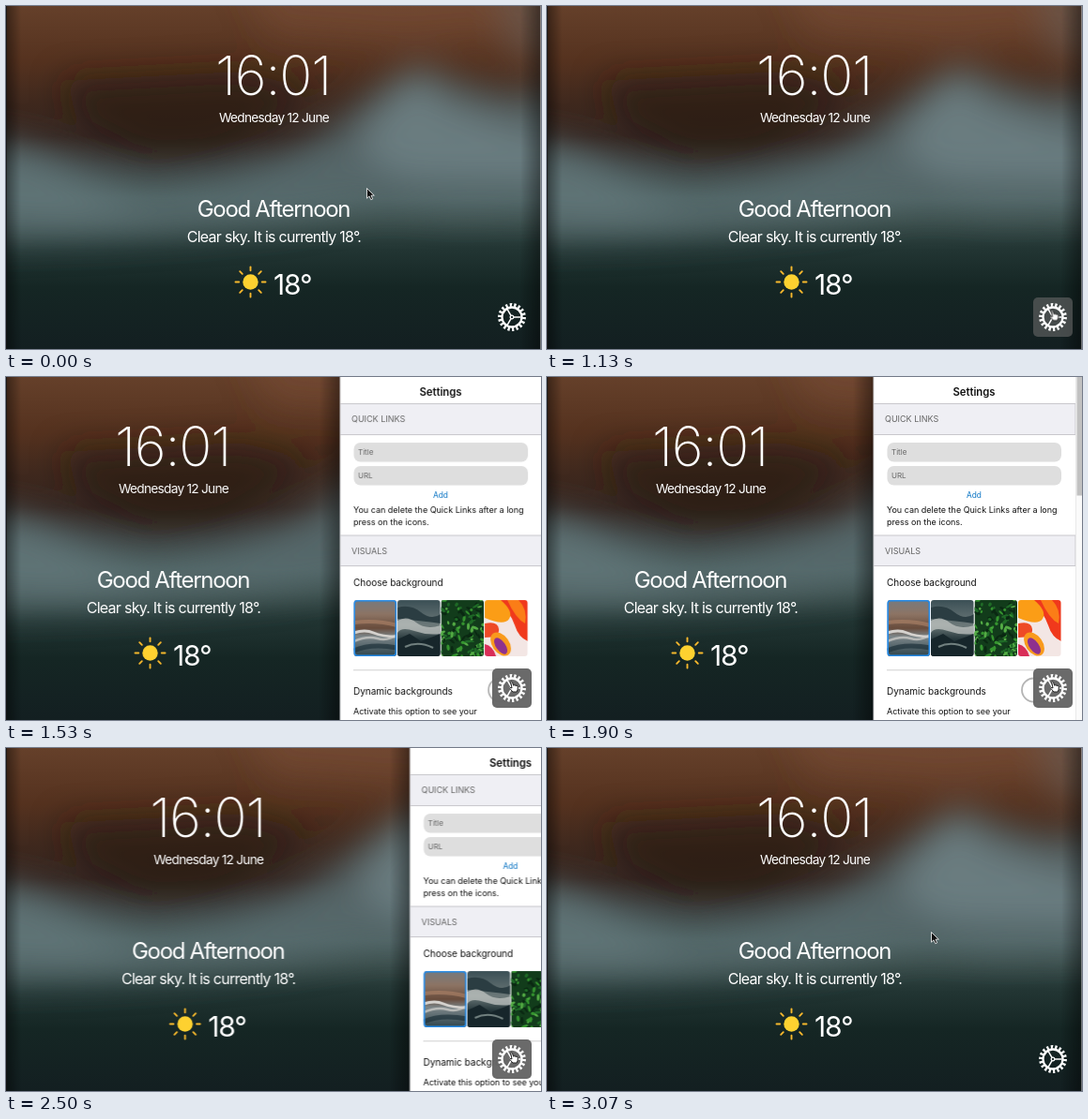
An HTML page that plays this animation: 570 by 366 pixels, repeating every 4.1 s.

```html
<!DOCTYPE html>
<html lang="en">
<head>
<meta charset="utf-8">
<title>New tab with settings panel</title>
<style>
html, body { margin: 0; width: 100%; height: 100%; overflow: hidden; background: #131f21; }
svg { display: block; }
#stage { width: 570px; height: 366px; }

.main { fill: #fff; font-family: Inter, "Open Sans", sans-serif; text-anchor: middle; letter-spacing: -.048em; }
.clock { font-size: 58px; font-weight: 200; letter-spacing: -.02em; font-feature-settings: "calt" 0; }
.date { font-size: 13.7px; letter-spacing: -.054em; }
.greet { font-size: 24px; letter-spacing: -.055em; }
.sky { font-size: 16px; letter-spacing: -.046em; }
.temp { font-size: 30px; text-anchor: start; letter-spacing: -.04em; }

.panel { font-family: Inter, "Open Sans", sans-serif; font-size: 9px; fill: #111; }
.title { font-size: 11.3px; font-weight: 600; text-anchor: middle; }
.head { font-size: 9px; fill: #666; }
.label { font-size: 10px; }
.hint { font-size: 8px; fill: #666; }
.add { font-size: 8.3px; fill: #0a74c4; text-anchor: middle; }

.main, .panel, .cursor, .arrow, .hand, .hover { animation: 4.1s infinite both; }
.main { animation-name: shift; animation-timing-function: ease-in-out; }
.panel { animation-name: slide; animation-timing-function: ease-in-out; }
.cursor { animation-name: point; }
.arrow { animation-name: arrow; animation-timing-function: step-end; }
.hand { animation-name: hand; animation-timing-function: step-end; }
.hover { animation-name: hover; animation-timing-function: linear; }

@keyframes shift {
  0%, 28.9% { transform: translateX(0); }
  38.66%, 56.87% { transform: translateX(-111px); }
  66.6%, 100% { transform: translateX(0); }
}
@keyframes slide {
  0%, 28.9% { transform: translateX(570px); }
  38.66%, 56.87% { transform: translateX(348px); }
  66.6%, 100% { transform: translateX(570px); }
}
@keyframes point {
  0% { transform: translate(384px, 194px); }
  16.2% { transform: translate(384px, 194px); animation-timing-function: ease-in-out; }
  28.05% { transform: translate(538px, 325px); }
  64.4% { transform: translate(538px, 325px); animation-timing-function: ease-in; }
  66.7% { transform: translate(516px, 313px); animation-timing-function: cubic-bezier(.3, .35, .5, 1); }
  74.6%, 100% { transform: translate(409px, 196px); }
}
@keyframes arrow {
  0% { opacity: 1; }
  25.4% { opacity: 0; }
  67.6%, 100% { opacity: 1; }
}
@keyframes hand {
  0% { opacity: 0; }
  25.4% { opacity: 1; }
  67.6%, 100% { opacity: 0; }
}
@keyframes hover {
  0%, 25.3% { opacity: 0; }
  28.8%, 67.8% { opacity: 1; }
  71.2%, 100% { opacity: 0; }
}
</style>
</head>
<body>
<svg id="stage" viewBox="0 0 570 366">
  <defs>
    <linearGradient id="haze" x2="0" y2="1">
      <stop offset="0" stop-color="#65402a"/>
      <stop offset=".16" stop-color="#55321f"/>
      <stop offset=".28" stop-color="#40291e"/>
      <stop offset=".38" stop-color="#35251f"/>
      <stop offset=".47" stop-color="#3f4342"/>
      <stop offset=".56" stop-color="#485c5b"/>
      <stop offset=".63" stop-color="#3a4d4b"/>
      <stop offset=".71" stop-color="#223533"/>
      <stop offset=".82" stop-color="#152624"/>
      <stop offset="1" stop-color="#131f21"/>
    </linearGradient>
    <linearGradient id="edge">
      <stop offset="0" stop-color="#000" stop-opacity="0"/>
      <stop offset="1" stop-color="#000" stop-opacity=".42"/>
    </linearGradient>
    <linearGradient id="shore" x2="0" y2="1">
      <stop offset="0" stop-color="#777a7e"/>
      <stop offset=".25" stop-color="#8d7464"/>
      <stop offset=".5" stop-color="#684c3c"/>
      <stop offset=".65" stop-color="#7d878a"/>
      <stop offset="1" stop-color="#2e444c"/>
    </linearGradient>
    <linearGradient id="storm" x2="0" y2="1">
      <stop offset="0" stop-color="#3c5056"/>
      <stop offset=".45" stop-color="#6c7979"/>
      <stop offset=".7" stop-color="#26373b"/>
      <stop offset="1" stop-color="#14232a"/>
    </linearGradient>
    <filter id="blur" filterUnits="userSpaceOnUse" x="-120" y="-120" width="810" height="606">
      <feGaussianBlur stdDeviation="18"/>
    </filter>
    <filter id="soft"><feGaussianBlur stdDeviation=".7"/></filter>
    <clipPath id="thumb"><rect width="45.5" height="60" rx="3"/></clipPath>
  </defs>

  <rect width="570" height="366" fill="url(#haze)"/>
  <g filter="url(#blur)">
    <path d="M-60 135L30 150L90 178L150 200L230 185L300 160L355 122L400 85L440 62L480 80L530 95L640 85V212L480 217L400 210L300 228L200 238L100 245L-60 250Z" fill="#5a6f72" opacity=".8"/>
    <path d="M60 80L250 70L330 90L290 125L230 160L150 165L80 130Z" fill="#281a15" opacity=".7"/>
    <path d="M370 150L400 110L435 75L470 105L560 135L640 125V185L420 180Z" fill="#7b9095" opacity=".6"/>
    <path d="M-60 155L30 165L110 205L180 222L60 230L-60 210Z" fill="#6a8082" opacity=".45"/>
    <path d="M250 -40H560V30L420 40L280 30Z" fill="#7d4f36" opacity=".5"/>
    <path d="M520 -40H640V70L535 55Z" fill="#6b6059" opacity=".55"/>
  </g>
  <rect width="16" height="366" fill="url(#edge)" transform="matrix(-1 0 0 1 16 0)"/>

  <g class="main">
    <text class="clock" x="284.500" y="94.500">16:01</text>
    <text class="date" x="285.500" y="124">Wednesday 12 June</text>
    <text class="greet" x="285" y="225">Good Afternoon</text>
    <text class="sky" x="285.500" y="251.500">Clear sky. It is currently 18°.</text>
    <g id="sun" transform="translate(260.500 294.500)" stroke="#f8b92d" stroke-width="1.900" stroke-linecap="round">
      <circle r="8.200" fill="#fdd130" stroke="none"/>
    </g>
    <text class="temp" x="285" y="307.700">18°</text>
  </g>
  <rect width="1" height="366" fill="#151515" opacity=".8"/>

  <g class="panel">
    <rect x="-22" width="22" height="366" fill="url(#edge)"/>
    <rect width="224" height="366" fill="#fff"/>
    <text class="title" x="107" y="20">Settings</text>
    <g fill="#efeff4" stroke="#c8c7cc">
      <path d="M0 28.500H215V61.500H0M0 169H215V201.500H0"/>
    </g>
    <path d="M0 0V366" stroke="#d5d5d8"/>
    <text class="head" x="12" y="48">QUICK LINKS</text>
    <g fill="#dedede">
      <rect x="14.500" y="70" width="185.500" height="20.500" rx="7"/>
      <rect x="14.500" y="95" width="185.500" height="20.500" rx="7"/>
    </g>
    <text class="hint" x="19" y="83.300">Title</text>
    <text class="hint" x="19" y="108.300">URL</text>
    <text class="add" x="107" y="128.500">Add</text>
    <text x="14" y="145">You can delete the Quick Links after a long</text>
    <text x="14" y="158">press on the icons.</text>
    <text class="head" x="12" y="189">VISUALS</text>
    <text class="label" x="14" y="222.500">Choose background</text>

    <g transform="translate(14.500 238)">
      <g clip-path="url(#thumb)">
        <rect width="46" height="60" fill="url(#shore)"/>
        <g filter="url(#soft)" fill="none" stroke="#d5d2ce">
          <path d="M0 35Q12 31 21 35T46 39" stroke-width="3"/>
          <path d="M0 44Q14 38 25 41T46 37" stroke-width="2.500" opacity=".7"/>
          <path d="M0 24Q24 21 46 27" stroke="#b08468" stroke-width="4" opacity=".6"/>
          <path d="M0 54Q18 46 46 51" stroke="#1f333b" stroke-width="5" opacity=".7"/>
        </g>
      </g>
      <rect x=".7" y=".7" width="44.100" height="58.600" rx="3" fill="none" stroke="#2389e6" stroke-width="1.600"/>
    </g>
    <g transform="translate(61 238)" clip-path="url(#thumb)">
      <rect width="46" height="60" fill="url(#storm)"/>
      <g filter="url(#soft)">
        <path d="M0 8Q14 4 25 13T46 15V25Q25 22 0 20Z" fill="#2b3d42"/>
        <path d="M0 22Q10 16 20 24T46 27V36Q32 38 18 33T0 35Z" fill="#c1c5c2" opacity=".75"/>
        <path d="M0 42L13 36L25 44L46 36V60H0Z" fill="#17262b"/>
        <path d="M8 50Q22 43 38 51" fill="none" stroke="#71807f" stroke-width="2"/>
      </g>
    </g>
    <g id="leaves" transform="translate(107.500 238)" clip-path="url(#thumb)">
      <rect width="46" height="60" fill="#123c1b"/>
    </g>
    <g transform="translate(154 238)" clip-path="url(#thumb)">
      <rect width="46" height="60" fill="#f3e6e4"/>
      <path d="M13 0H46V44Q36 40 32 27T13 0Z" fill="#f0391c"/>
      <path d="M0 0H17Q31 12 26 20T0 19Z" fill="#fb9d16"/>
      <path d="M24 0H36Q46 10 43 25Q33 20 24 0Z" fill="#fb7d17"/>
      <path d="M0 25Q14 22 15 31T0 40Z" fill="#ee4a26"/>
      <ellipse cx="17" cy="47" rx="9" ry="14" fill="#f99a1c" transform="rotate(-35 17 47)"/>
      <ellipse cx="17" cy="49" rx="5" ry="10" fill="#8e318e" transform="rotate(-35 17 49)"/>
      <path d="M0 47Q9 49 12 60H0Z" fill="#d92e58"/>
    </g>

    <path d="M14 312.800H200" stroke="#cfcfcf"/>
    <text class="label" x="14" y="338.500">Dynamic backgrounds</text>
    <rect x="158" y="321.500" width="42" height="25" rx="12.500" fill="#fff" stroke="#b4b4b4" stroke-width="1.800"/>
    <text x="14" y="360">Activate this option to see your</text>
    <rect x="215" width="7" height="366" fill="#fafafa"/>
    <path d="M215.500 0V366" stroke="#e8e8e8"/>
    <rect x="216.500" width="5.500" height="126.500" fill="#c1c1c1"/>
  </g>

  <rect class="hover" x="518" y="311" width="42" height="42" rx="5" fill="#666" fill-opacity=".97"/>
  <g id="gear" transform="translate(539 332)" fill="none" stroke="#fff">
    <circle r="13" stroke-width="3.800" pathLength="36" stroke-dasharray="1 1"/>
    <circle r="10.500" stroke-width="2.300"/>
    <circle r="1.800" stroke-width="1.300"/>
  </g>

  <g class="cursor">
    <path class="arrow" d="M.5 .5V11.200L3 8.900L4.800 12.700L6.700 11.800L5 8.200H8.300Z" fill="#111" stroke="#fff" stroke-width=".8"/>
    <path class="hand" d="M-.3 .6Q.6 -.6 1.500 .6L2.600 4.200L3.800 3.700L5 4.300L6.200 4.200L7.200 5.200V8.200L6.200 11H2L-1.300 7.300Q-1.200 6 .2 6.600L1 7Z" fill="#fff" stroke="#222" stroke-width="1" stroke-linejoin="round"/>
  </g>
</svg>
<script>
const add = (id, attrs, tag = 'path') => {
  const el = document.createElementNS('http://www.w3.org/2000/svg', tag);
  for (const key in attrs) el.setAttribute(key, attrs[key]);
  document.getElementById(id).append(el);
};

for (let i = 0; i < 8; i++) add('sun', { d: 'M12.300 0H16', transform: `rotate(${i * 45})` });
for (let i = 0; i < 3; i++) add('gear', { d: 'M2 0H9.500', 'stroke-width': 1.5, transform: `rotate(${i * 120})` });

let seed = 7;
const rand = () => (seed = seed * 16807 % 2147483647) / 2147483647;
const greens = ['#1f6b27', '#35952f', '#0a2812', '#54ac45'];
for (let i = 0; i < 110; i++) {
  const x = rand() * 46, y = rand() * 60;
  add('leaves', {
    rx: 1.2 + rand() * 3, ry: .8 + rand(), fill: greens[i % 4],
    transform: `translate(${x} ${y}) rotate(${rand() * 180})`
  }, 'ellipse');
}
</script>
</body>
</html>
```
